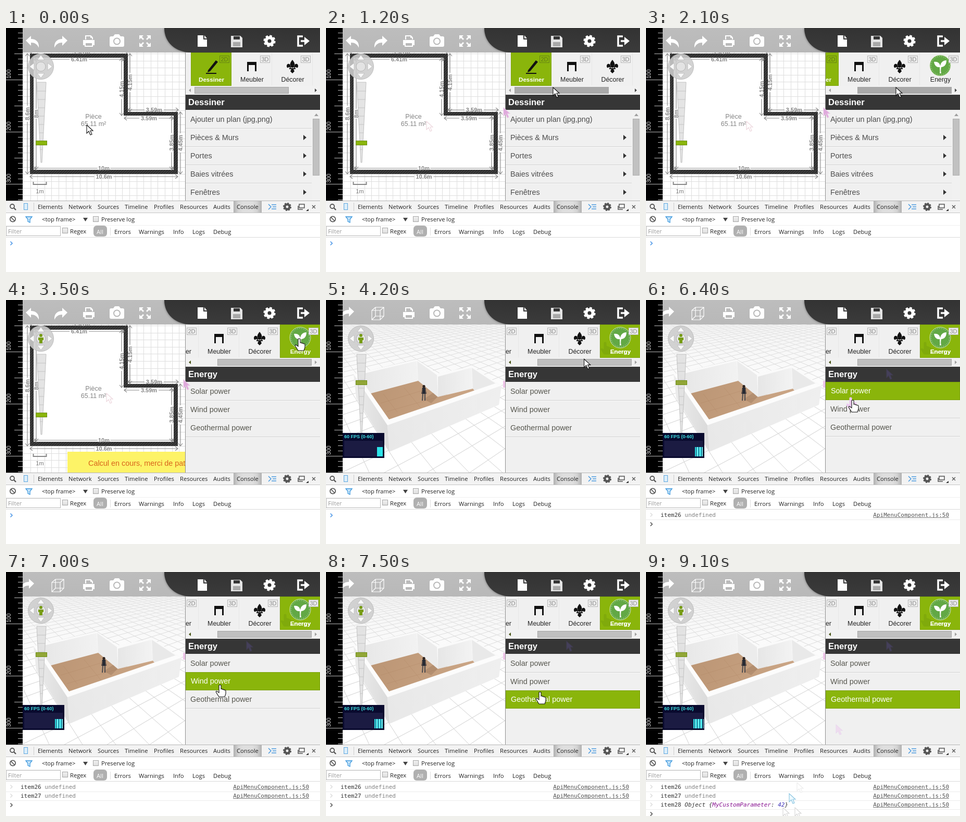
Animation of 603x468 px, one loop 9600 ms. Source, as an HTML page with a canvas:

```html
<!DOCTYPE html>
<html lang="fr">
<head>
<meta charset="utf-8">
<style>
html, body { margin: 0; width: 603px; height: 468px; overflow: hidden; }
canvas { display: block; }
</style>
</head>
<body>
<canvas id="stage" width="603" height="468"></canvas>
<script>
const g = document.getElementById('stage').getContext('2d');
const LOOP = 9600, GREEN = '#8ab50b', SANS = '"Liberation Sans", Arial, sans-serif';
const UI = '11.2px "Open Sans", sans-serif', MONO = '11px "DejaVu Sans Mono", monospace';

// Periods in which the picture moves, in steps of 100 ms; it rests in between.
const PERIODS = [[300, 1200], [1600, 2100], [2600, 3100], [3500, 3600], [4100, 4600], [4900, 5600],
  [5900, 6000], [6400, 6600], [6800, 7300], [7500, 7600], [7800, 8400], [8800, 9100]];

// Pointer path: time, x, y
const POINTER = [[200, 155, 186], [500, 193, 179], [700, 341, 153], [900, 530, 92], [1200, 436, 114],
  [1500, 436, 114], [2100, 480, 114], [2500, 480, 114], [3100, 563, 74], [4000, 563, 74],
  [4300, 462, 133], [4600, 383, 218], [4900, 383, 218], [5100, 458, 226], [5400, 405, 171],
  [5600, 391, 183], [6300, 391, 183], [6400, 397, 192], [6600, 411, 212], [6900, 411, 212],
  [7300, 411, 230], [7700, 411, 230], [8000, 365, 293], [8200, 290, 404], [8400, 286, 450],
  [8700, 286, 450], [8900, 275, 425], [9000, 263, 452], [9100, 255, 480]];

function rect(x, y, w, h, color) { g.fillStyle = color; g.fillRect(x, y, w, h); }
function box(x, y, w, h, color, fill) {
  if (fill) rect(x, y, w, h, fill);
  g.strokeStyle = color; g.lineWidth = 1; g.strokeRect(x + .5, y + .5, w - 1, h - 1);
}
function text(s, x, y, color, font, align = 'left') {
  g.font = font; g.textAlign = align; g.fillStyle = color; g.fillText(s, x, y);
}
function shape(d, fill, stroke, width = 1, x = 0, y = 0, sx = 1) {
  const p = new Path2D(d);
  g.save(); g.translate(x, y); g.scale(sx, 1);
  if (fill) { g.fillStyle = fill; g.fill(p, 'evenodd'); }
  if (stroke) { g.strokeStyle = stroke; g.lineWidth = width; g.stroke(p); }
  g.restore();
}
function disc(x, y, r, fill, stroke, width = 1) {
  g.beginPath(); g.arc(x, y, r, 0, 7);
  if (fill) { g.fillStyle = fill; g.fill(); }
  if (stroke) { g.strokeStyle = stroke; g.lineWidth = width; g.stroke(); }
}
function gear(x, y, r, color) {
  disc(x, y, r * .57, null, color, r * .52);
  g.setLineDash([r * .38, r * .86 * Math.PI / 4 - r * .38]);
  disc(x, y, r * .86, null, color, r * .3);
  g.setLineDash([]);
}
function gradient(x0, y0, x1, y1, ...colors) {
  const gr = g.createLinearGradient(x0, y0, x1, y1);
  colors.forEach((c, i) => gr.addColorStop(i / (colors.length - 1), c));
  return gr;
}

function dimension(x1, y1, x2, y2, label, at = .5) {
  const len = Math.hypot(x2 - x1, y2 - y1), half = label.length * 3.1 + 3, m = len * at;
  g.save();
  g.translate(x1, y1);
  g.rotate(Math.atan2(y2 - y1, x2 - x1));
  shape(`M0 0H${m - half}M${m + half} 0H${len}M5 -4L0 0L5 4M${len - 5} -4L${len} 0L${len - 5} 4`, null, '#8c8c8c', 1.2);
  text(label, m, 4, '#858585', 'bold 11px ' + SANS, 'center');
  g.restore();
}

function plan() {
  rect(32, 47, 313, 284, '#fff');
  for (let x = 33; x < 345; x += 13.6) rect(Math.round(x), 47, 1, 284, '#dedede');
  for (let y = 49; y < 331; y += 13.6) rect(32, Math.round(y), 313, 1, '#dedede');
  const outer = 'M46 49H234V161H330V280H46Z', walls = outer + 'M53 57V272H322V168H226V57Z';
  shape(outer, '#fff');
  shape(walls, '#303030');
  g.save();
  g.clip(new Path2D(walls), 'evenodd');
  let hatch = '';
  for (let k = 90; k < 620; k += 5) hatch += `M${k} 0L${k - 300} 300`;
  shape(hatch, null, '#4c4c4c');
  g.restore();
  dimension(46, 46, 234, 46, '7.01m', .53);
  dimension(54, 60, 227, 60, '6.41m');
  dimension(222, 168, 222, 58, '4.15m', .46);
  dimension(238, 160, 238, 49, '4.15m');
  dimension(234, 157, 331, 157, '3.59m', .52);
  dimension(227, 173, 322, 173, '3.59m');
  dimension(318, 271, 318, 169, '3.85m');
  dimension(335, 280, 335, 161, '4.45m');
  dimension(54, 269, 322, 269, '10m');
  dimension(46, 285, 330, 285, '10.6m');
  dimension(41, 280, 41, 49, '8.6m');
  dimension(58, 271, 58, 58, '8m');
  text('Pièce', 168, 174, '#858585', '12.5px ' + SANS, 'center');
  text('65.11 m²', 168, 188, '#858585', '12.5px ' + SANS, 'center');
  shape('M52.5 295V301M77.5 295V301M52 300H78', null, '#888', 2);
  text('1m', 65, 317, '#777', '11px ' + SANS, 'center');
}

function room() {
  rect(32, 47, 313, 284, gradient(0, 47, 0, 200, '#f4f4f4', '#fff'));
  let lines = '';
  for (let k = -30; k < 30; k++)
    lines += `M836 -50L${30 + k * 82} 331M-95 -50L${147 + k * 64} 331`;
  g.save();
  g.beginPath(); g.rect(32, 47, 313, 284); g.clip();
  shape(lines, null, gradient(0, 47, 0, 250, '#e4e4e4', '#cfcfcf'));
  g.restore();
  shape('M53 142L174 114L214 141L280 127L337 164L332 201L122 291L58 188Z', '#fafafa');
  shape('M60 144L174 117L177 156L83 180Z', gradient(60, 0, 176, 0, '#e6e6e6', '#f2f2f2'));
  shape('M175 117L213 144L215 186L177 156Z', '#ececec');
  shape('M215 147L279 130L282 170L215 186Z', gradient(215, 0, 281, 0, '#e6e6e6', '#f3f3f3'));
  shape('M280 130L327 161L290 180L282 170Z', '#e9e9e9');
  shape('M83 180L177 155L215 186L282 170L290 180L120 233Z', gradient(90, 160, 260, 220, '#bb9574', '#caa585'));
  shape('M105 198L190 172M117 214L233 181M110 180L137 215M150 168L182 207', null, 'rgba(150,105,72,.15)');
  shape('M188 190L206 178L214 186L202 198Z', 'rgba(100,65,45,.18)');
  shape('M53 142L118 240L122 291L58 188Z', gradient(53, 0, 122, 0, '#ededed', '#dadada'));
  shape('M118 240L337 164L332 201L122 291Z', gradient(120, 0, 335, 0, '#e8e8e8', '#efefef'));
  shape('M53 142L61 143L121 229L325 160L337 164L118 240Z', '#fcfcfc');
  // standing figure
  disc(188, 165.5, 2.6, '#2b211d');
  shape('M185 168H191L193 180H183Z', '#272a33');
  shape('M186 180L185 193M190 180L190 193', null, '#4c4a4d', 2);
  shape('M184 180L185 171M192 180L191 171', null, '#8a6a56');
}

function fpsMeter(t) {
  rect(32, 255, 80, 48, '#090a2e');
  rect(35, 270, 74, 30, '#1b1b42');
  text('60 FPS (0-60)', 35, 265, '#3cdde0', 'bold 9px ' + SANS);
  const left = Math.floor(97 - (t - 4900) / 700);
  rect(left, 282, 109 - left, 18, '#2ce3e8');
  if (t > 5500) for (let x = left + 2; x < 109; x += 5) {
    rect(x, 282, 1, 18, '#1b3a62');
    rect(x + 2, 282, 1, 18, '#a6f2f6');
  }
}

function navigation(t, is3d) {
  disc(67, 74, 24.5, 'rgba(205,205,205,.88)', '#bdbdbd');
  shape('M67 52L74 61H60ZM67 96L74 87H60ZM45 74L54 67V81ZM89 74L80 67V81Z', '#f8f8f8', '#b5b5b5', .7);
  disc(67, 74, 9, '#e3e3e3', '#b5b5b5');
  if (t >= 3500) {
    disc(67, 68, 3, '#779c15');
    shape('M62 72H72V77H70V83H64V77H62Z', '#779c15');
  }
  shape('M59 104H77L69 258H67Z', 'rgba(225,225,225,.9)', '#c2c2c2');
  for (let y = 121; y < 245; y += 16) {
    const w = 9 * (258 - y) / 154 + 1;
    shape(`M${68 - w} ${y}H${68 + w}`, null, '#c4c4c4');
  }
  box(57, is3d ? 154 : 216, 22, 9, '#6d8f12', is3d ? '#92a638' : GREEN);
}

function toolbar(is3d) {
  rect(32, 0, 571, 47, gradient(0, 0, 0, 47, '#bdbdbd', '#b8b8b8'));
  const arrow = 'M13 -3L3 -12V-6C-7 -6 -13 0 -12 11C-9 4 -4 1 3 1V7Z';
  if (is3d) {
    shape(arrow, '#fff', null, 1, 41, 25);
    shape('M88 20L95 14H111V31L104 38H88ZM88 20H104V38M104 20L111 14M95 14V31H111M95 31L88 38', null, '#fff', 1.2);
  } else {
    shape(arrow, '#fff', null, 1, 51, 27, -1);
    shape(arrow, '#fff', null, 1, 105, 27);
  }
  shape('M152 14H163L167 18V22H152ZM154 16V22H165V19H162V16ZM148 23H170V33H167V36H151V33H148ZM153 29V34H165V29Z', '#fff');
  shape('M202 16H206L209 12H217L220 16H224Q227 16 227 19V33Q227 36 224 36H202Q199 36 199 33V19Q199 16 202 16Z', '#fff');
  disc(213, 25.5, 6, '#fff', '#b9b9b9', 2);
  for (let i = 0; i < 4; i++) {
    g.save(); g.translate(267, 25); g.rotate(i * Math.PI / 2);
    shape('M11 -11V-3L8 -6L4 -2L2 -4L6 -8L3 -11Z', '#fff');
    g.restore();
  }
  g.save();
  g.shadowColor = 'rgba(0,0,0,.5)'; g.shadowBlur = 4;
  shape('M304 0C304 28 326 47 356 47H603V0Z', gradient(0, 0, 0, 47, '#333', '#3b3b3b'));
  g.restore();
  shape('M368 14H379V22H386V36H368ZM381 14L386 20H381Z', '#fff');
  shape('M432 15H450L454 19V37H432ZM437 16V22H449V16ZM436 27V35H450V27Z', '#e4e4e4');
  rect(436, 27, 14, 8, '#a9a9a9');
  gear(506, 25, 11.5, '#fff');
  shape('M570 16H561V34H570M566 25H577', null, '#fff', 3.5);
  shape('M573 17L583 25L573 33Z', '#fff');
}

function ruler() {
  rect(0, 0, 32, 331, '#000');
  for (let v = 0; v < 34; v++) {
    const y = v * 10 - 1, len = v % 10 === 0 ? 32 : v % 5 === 0 ? 16 : 9;
    rect(32 - len, y, len, 1, '#bbb');
    if (v && v % 10 === 0) {
      g.save(); g.translate(9, y - 2); g.rotate(-Math.PI / 2);
      text(v * 10, 0, 0, '#ddd', '10.5px ' + SANS);
      g.restore();
    }
  }
}

function tabIcon(i, x) {
  if (i === 0) {
    shape('M388 81L403 62L407 65L392 83L387 85Z', '#111', null, 1, x - 394);
    shape('M-10 87H10', null, '#111', 2, x);
  } else if (i === 1) shape('M-9 65H9V83H6V71H-6V83H-9Z', '#111', null, 1, x);
  else if (i === 2) {
    shape('M0 61C6 68 5 72 2 76H-2C-5 72 -6 68 0 61ZM3 76C3 67 11 67 11 73C11 77 8 77 7 75C6 74 5 76 5 77ZM-3 76C-3 67 -11 67 -11 73C-11 77 -8 77 -7 75C-6 74 -5 76 -5 77ZM-6 77H6V79H-6ZM-2 79H2L4 83L0 87L-4 83Z', '#111', null, 1, x);
  } else {
    disc(x, 72, 20, '#62a845', '#d3e6bd');
    g.setLineDash([2, 2]); disc(x, 72, 17.5, null, '#b4d69f'); g.setLineDash([]);
    shape('M-1 87C0 82 -1 80 -1 75C-8 76 -11 71 -12 65C-5 64 -1 67 0 73C1 66 5 62 12 62C12 70 8 75 2 75C1 80 1 83 2 87Z', '#fff', null, 1, x);
  }
}

function panel(t) {
  const energy = t >= 3500, drag = Math.min(1, Math.max(0, (t - 1500) / 600));
  g.save();
  g.beginPath(); g.rect(344, 47, 259, 284); g.clip();
  rect(344, 47, 259, 284, '#f0f0f0');
  ['Dessiner', 'Meubler', 'Décorer', 'Energy'].forEach((name, i) => {
    const x = Math.round(355 + 78 * i - 63 * drag), mid = x + 39, on = energy ? i === 3 : i === 0;
    const hover = i === 3 && t >= 2900;
    if (on) box(x, 47, 78, 64, '#7da40a', GREEN);
    else if (hover) rect(x, 47, 78, 64, '#fff');
    rect(x + 77, 48, 1, 62, on ? '#7da40a' : '#e6e6e6');
    tabIcon(i, mid);
    text(name, mid + .5, 103, on ? '#fff' : '#222', (on ? 'bold 11.6px ' : '12.4px ') + SANS, 'center');
    const dark = on && i === 0;
    box(x + 55, 53, 19, 14, dark ? '#668314' : '#b5b5b5', dark ? null : '#efefef');
    text(i ? '3D' : '2D', x + 64.5, 64, dark ? '#5d7716' : '#888', '11px ' + SANS, 'center');
  });
  rect(345, 111, 258, 17, '#f1f1f1');
  box(362 + Math.round(44 * drag), 113, 181, 13, '#a5a5a5', t >= 1200 && t < 2600 ? '#a9a9a9' : '#bfbfbf');
  shape('M355 116V123L351 119.5Z', energy ? '#465315' : '#a0a0a0');
  shape('M593 116V123L597 119.5Z', energy ? '#a0a0a0' : '#444');
  rect(345, 128, 258, 29, '#363636');
  text(energy ? 'Energy' : 'Dessiner', 350, 148, '#fff', 'bold 16.5px ' + SANS);

  const rows = energy ? ['Solar power', 'Wind power', 'Geothermal power']
    : ['Ajouter un plan (jpg,png)', 'Pièces & Murs', 'Portes', 'Baies vitrées', 'Fenêtres'];
  const selected = t >= 7500 ? 2 : t >= 6800 ? 1 : t >= 5900 ? 0 : -1, right = energy ? 603 : 587;
  rows.forEach((name, i) => {
    const on = i === selected, y = 157 + 35 * i - (selected >= 0 && i > selected ? 1 : 0);
    if (i === 1 && t >= 4500 && t < 5900) rect(345, y + 1, 258, 35, '#fcfcfc');
    if (on) box(345, y, 258, 35, '#7ca20c', GREEN);
    else {
      rect(345, y + 35, right - 345, 1, '#cfcfcf');
      rect(345, y + 36, right - 345, 1, '#fbfbfb');
    }
    text(name, on ? 355 : 354, y + (on ? 22 : 23), on ? '#fff' : energy ? '#57574f' : '#4c4c4c', '14.4px ' + SANS);
    if (!energy && i) shape(`M571 ${y + 13}L577 ${y + 18}L571 ${y + 23}Z`, '#333');
  });
  if (!energy) {
    rect(588, 157, 15, 174, '#f1f1f1');
    shape('M592 169H600L596 164Z', '#a0a0a0');
    box(589, 174, 13, 109, '#aeaeae', '#c1c1c1');
  }
  rect(344, 47, 1, 284, '#8f8f8f');
  g.restore();
}

function devtools(t) {
  rect(0, 331, 603, 137, '#fff');
  rect(0, 331, 603, 24, '#f3f3f3');
  rect(0, 331, 603, 1, '#b4b4b4');
  rect(0, 354, 603, 1, '#c4c4c4');
  rect(0, 378, 603, 1, '#efefef');
  rect(0, 401, 603, 1, '#d9d9d9');
  rect(437, 332, 54, 22, gradient(437, 0, 491, 0, '#b0b0b0', '#d4d4d4', '#dedede', '#dedede', '#dedede', '#d4d4d4', '#b0b0b0'));
  const label = (s, x, y, c = '#222') => text(s, x, y, c, UI);
  const tabs = { Elements: 61, Network: 120, Sources: 176, Timeline: 228, Profiles: 284, Resources: 334, Audits: 398, Console: 443 };
  for (const name in tabs) label(name, tabs[name], 347);
  disc(12, 342, 4, null, '#555', 1.8);
  shape('M15 345L19 349', null, '#555', 2.4);
  rect(53, 335, 1, 16, '#ccc');
  box(34, 336, 8, 13, '#5da7e0', '#dceefa');
  shape('M504 338L509 343L504 348M510 339H519M512 343H519M510 347H519', null, '#4b9be0', 1.5);
  gear(540, 343, 8, '#555');
  shape('M563 338H573V345H563ZM561 341V348H570', null, '#555', 1.5);
  shape('M576 351H581V347Z', '#333');
  shape('M588 340L594 346M594 340L588 346', null, '#555', 1.4);

  disc(13, 366.5, 5.2, null, '#555', 1.7);
  shape('M9.5 363L16.5 370', null, '#555', 1.7);
  shape('M38 362H50L46 367V373L42 371V367Z', '#cbe7fa', '#3b97dd', 1.3);
  label('<top frame>', 69, 371);
  shape('M148 364H157L152.5 371Z', '#444');
  const check = (x, y) => box(x, y, 11, 11, '#a6a6a6', gradient(0, y, 0, y + 11, '#f2f2f2', '#ddd'));
  check(167, 361); label('Preserve log', 183, 371);
  box(0, 380, 105, 19, '#b6b6b6', '#fff');
  label('Filter', 4, 394, '#9a9a9a');
  check(108, 383); label('Regex', 123, 394);
  g.fillStyle = '#b0b0b0';
  g.beginPath(); g.roundRect(168, 379, 26, 21, 6); g.fill();
  label('All', 174, 394.5, '#fff');
  rect(200, 383, 1, 15, '#ddd');
  const filters = { Errors: 208, Warnings: 255, Info: 321, Logs: 358, Debug: 398 };
  for (const name in filters) label(name, filters[name], 394.5);

  const chevron = (y, color, w) => shape(`M8.5 ${y - 3.5}L12 ${y}L8.5 ${y + 3.5}`, null, color, w);
  const count = t >= 7600 ? 3 : t >= 6900 ? 2 : t >= 6000 ? 1 : 0;
  for (let i = 0; i < count; i++) {
    const y = 416 + 17 * i;
    chevron(y - 4, '#d6d6d6', 1.2);
    rect(0, y + 5, 603, 1, '#ececec');
    let x = 28;
    const write = (s, c, style = '') => { text(s, x, y, c, style + MONO); x += g.measureText(s).width; };
    write('item' + (26 + i) + ' ', '#333');
    if (i < 2) write('undefined', '#808080');
    else {
      write('Object {', '#333', 'italic ');
      write('MyCustomParameter', '#881391', 'italic ');
      write(': ', '#333', 'italic ');
      write('42', '#3b30b8', 'italic ');
      write('}', '#333', 'italic ');
    }
    text('ApiMenuComponent.js:50', 582, y, '#555', MONO, 'right');
    rect(436, y + 1, 146, 1, '#777');
  }
  chevron(count ? 413 + 17 * count : 413, count ? '#555' : '#4b96e6', 1.6);
}

function pointer(x, y, hand, fill = '#fff', line = '#111') {
  const arrow = 'M0 0V16L4 12L7 19L10 18L7 11H12Z';
  const palm = 'M-2 1Q0 -1 2 1V8Q4 7 5 9Q7 8 8 10Q11 9 11 12V17L9 23H-2L-7 15Q-9 12 -6 12L-2 15Z';
  shape(hand ? palm : arrow, fill, line, 1.1, x, y);
}

// Faint traces the pointer leaves behind: start, end, x, y, hand, fill, line
const TRACES = [[600, 3600, 193, 179, 0, '#fff', '#ecd5dc'], [800, 3600, 341, 153, 0, '#dfa9dc', '#e9c4e6'],
  [4400, LOOP, 462, 133, 0, '#45405a', '#403c50'], [4200, LOOP, 536, 81, 1, '#80aa0c', '#80aa0c'],
  [6400, 6800, 393, 187, 1, '#ecc9f0', '#ecc9f0'], [8100, LOOP, 365, 293, 0, '#efdcef', '#ead9ee'],
  [8300, LOOP, 290, 404, 0, '#fff', '#ececec'], [8900, LOOP, 275, 425, 0, '#eef9ff', '#86c3df'],
  [8800, LOOP, 286, 452, 0, '#fff', '#d5d5d5'], [9100, LOOP, 263, 452, 0, '#fff', '#d5d5d5']];

function pointerAt(t) {
  const i = POINTER.findIndex(p => p[0] > t);
  if (i === 0) return POINTER[0].slice(1);
  if (i < 0) return POINTER.at(-1).slice(1);
  const a = POINTER[i - 1], b = POINTER[i], k = (t - a[0]) / (b[0] - a[0]);
  return [a[1] + (b[1] - a[1]) * k, a[2] + (b[2] - a[2]) * k];
}

function settle(t) {
  const last = PERIODS.filter(p => p[0] <= t).at(-1);
  return last ? Math.min(Math.floor(t / 100) * 100, last[1]) : 0;
}

function draw(t) {
  const is3d = t >= 3600;
  if (is3d) room(); else plan();
  navigation(t, is3d);
  if (is3d) fpsMeter(t);
  if (t >= 3500 && t < 4100) {
    rect(118, 291, 227, 40, '#fdf367');
    text('Calcul en cours, merci de patienter', 158, 318, '#d9641c', '14.4px ' + SANS);
  }
  toolbar(is3d);
  ruler();
  panel(t);
  if (is3d) rect(340, 155, 4, 13, '#f0c6ea');
  devtools(t);
  for (const [from, to, ...trace] of TRACES) if (t >= from && t < to) pointer(...trace);
  if (t >= 4200) text('Energy', 565.5, 103, '#fff', 'bold 11.6px ' + SANS, 'center');
  const [x, y] = pointerAt(t);
  pointer(x, y, x > 345 && (y > 48 && y < 111 || y > 157 && y < 262));
}

function frame(now) {
  draw(settle(now % LOOP));
  requestAnimationFrame(frame);
}
requestAnimationFrame(frame);
</script>
</body>
</html>
```
